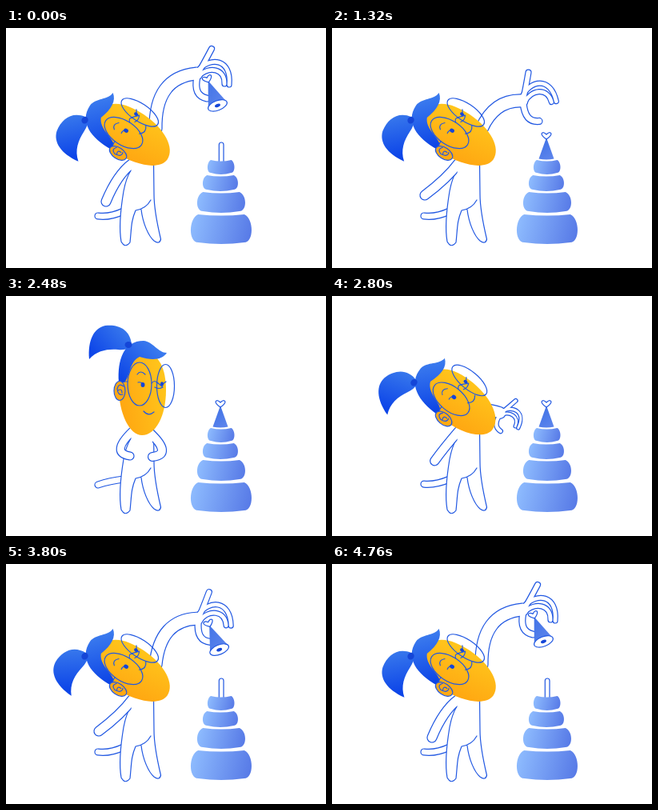
Animation of 400 by 300 pixels, one loop 4800 ms. Source, as an HTML page with a canvas:

```html
<!DOCTYPE html>
<html lang="en">
<head>
<meta charset="utf-8">
<title>Stacking toy</title>
<style>
html, body { margin: 0; width: 100%; height: 100%; overflow: hidden; background: #fff; }
canvas { display: block; width: 400px; height: 300px; }
</style>
</head>
<body>
<canvas id="stage" width="400" height="300"></canvas>
<script>
const ctx = document.getElementById('stage').getContext('2d');
const LOOP = 4800, MIRROR = 2160, LINE = '#2158e2', DARK = '#1546d8';

// elbow x,y, wrist x,y, hand turn
const ARM = {
  up:   [186, 62, 238, 57, 0],
  low:  [203, 88, 240, 91, -18],
  grip: [222, 103, 257, 119, 26],
  open: [203, 90, 237, 91, -18],
  hip:  [208, 198, 183, 201, 60]
};
// tip x,y, turn, how much of the underside shows
const CONE = { up: [253, 67, -21, 1], low: [257, 99, -24, 1], placed: [268, 138, 0, 0] };

const mix = (a, b, u) => a + (b - a) * u;
const mixAll = (a, b, u) => a.map((v, i) => mix(v, b[i], u));
const ease = (t, from, to) => {
  const u = Math.min(1, Math.max(0, (t - from) / (to - from)));
  return u * u * (3 - 2 * u);
};
const through = (t, times, poses) => times.slice(1).reduce(
  (pose, end, i) => mixAll(pose, poses[i + 1], ease(t, times[i], end)), poses[0]);

function ellipse(x, y, rx, ry) {
  const p = new Path2D();
  p.ellipse(x, y, rx, ry, 0, 0, 7);
  return p;
}

function shape(path, fill, stroke) {
  const p = typeof path === 'string' ? new Path2D(path) : path;
  if (fill) { ctx.fillStyle = fill; ctx.fill(p); }
  if (stroke) { ctx.strokeStyle = stroke; ctx.lineWidth = 1.2; ctx.stroke(p); }
}

function ramp(x1, y1, x2, y2, from, to) {
  const g = ctx.createLinearGradient(x1, y1, x2, y2);
  g.addColorStop(0, from);
  g.addColorStop(1, to);
  return g;
}

function at(x, y, deg, draw) {
  ctx.save();
  ctx.translate(x, y);
  ctx.rotate(deg * Math.PI / 180);
  draw();
  ctx.restore();
}

// Round tubes [path, width] merged into one outlined white shape
function tubes(list) {
  for (const [color, grow] of [[LINE, 1.2], ['#fff', -1.2]])
    for (const [path, width] of list) {
      ctx.strokeStyle = color;
      ctx.lineWidth = width + grow;
      ctx.stroke(path);
    }
}

function ring(l, r, t, b) {
  const c = (l + r) / 2, i = (r - l) * .12, out = i / 3, h = b - t;
  shape(`M${l + i} ${t} Q${c} ${t + 3} ${r - i} ${t}
    C${r + out} ${t + h * .15} ${r + out} ${b - 2} ${r - i} ${b - 2}
    Q${c} ${b + 2} ${l + i} ${b - 2}
    C${l - out} ${b - 2} ${l - out} ${t + h * .15} ${l + i} ${t}Z`, ramp(l, t, r, t + h / 2, '#90beff', '#587be7'));
}

function stack(showPole) {
  if (showPole) shape('M266.300 168V146Q266.300 143 269.200 143Q272 143 272 146V168', '#fff', LINE);
  ring(252, 285.5, 165, 183);
  ring(246, 290, 184, 204);
  ring(239, 299, 205, 231);
  ring(231, 307, 233, 270);
}

function cone([x, y, turn, open]) {
  const w = mix(9.5, 12.5, open), len = mix(25.5, 32, open);
  at(x, y, turn, () => {
    shape(`M0 -1 L${w} ${len} Q0 ${len + 2} ${-w} ${len}Z`, ramp(-w, 0, w, len, '#3c70e6', '#5f86ec'));
    if (open > .05) {
      shape(ellipse(0, len, w, 6 * open), '#fff', LINE);
      shape(ellipse(0, len, 3.6 * open, 2 * open), DARK);
    }
    shape('M0 1 Q-6 -3 -6 -6 Q-4 -9 0 -5 Q4 -9 6 -6 Q6 -3 0 1Z', '#fff', LINE);
  });
}

function reachingArm([ex, ey, wx, wy, turn], hip) {
  const list = [[new Path2D(`M${mix(187, 181, hip)} ${mix(126, 172, hip)}Q${ex} ${ey} ${wx} ${wy}`), mix(16, 11, hip)]];
  const size = 1 - hip, place = new DOMMatrix().translate(wx, wy).rotate(turn).scale(size);
  const addFinger = (d, width) => {
    const finger = new Path2D();
    finger.addPath(new Path2D(d), place);
    list.push([finger, width * size]);
  };
  if (size > .02) {
    addFinger('M3 -2Q9 -12 19 -31', 7);
    addFinger('M2 -4C18 -22 44 -18 41 14', 6);
    addFinger('M3 3C16 -10 36 -6 35 13', 6);
    addFinger('M1 4C-2 18 0 28 13 31', 8);
  }
  tubes(list);
}

function body(up, swing, arm, hip) {
  tubes([[new Path2D(`M147 229Q130 ${mix(237, 231, up)} 115 ${mix(235, 236, up)}`), 8]]);
  shape(`M156 178 Q150 188 147 204 C143 228 141 250 144 267 Q149 276 155 268 C157 250 156 242 162 228
    L169 227 C171 244 178 260 185 266 Q192 271 193.500 264 C189 245 185 225 185 208 L184.500 166`, '#fff');
  shape(`M156 178 Q150 188 147 204 C143 228 141 250 144 267 Q149 276 155 268 C157 250 156 242 162 228
    Q175 226 181 215 M169 227 C171 244 178 260 185 266 Q192 271 193.500 264
    C189 245 185 225 185 208 L184.500 166`, null, LINE);
  const rest = mixAll(mixAll([139, 183, 125, 217], [144, 188, 116, 209], swing), [130, 196, 155, 200], hip);
  tubes([[new Path2D(`M158 169Q${rest}`), mix(12, 10, hip)]]);
  reachingArm(arm, hip);
  shape('M155 160H183V184H157Z', '#fff');
}

function head(up, sway) {
  at(mix(147, 167, up), mix(131, 110, up), mix(-56, 0, up), () => {
    ctx.translate(-167, -110);
    at(152, 61, sway, () => {
      ctx.translate(-152, -61);
      shape('M157 60C155 42 141 35 124 37C110 40 102 55 104 79C114 68 127 66 140 67Q150 68 155 64Z',
        ramp(145, 40, 108, 72, '#3676ec', '#0d45e8'));
    });
    shape(`M170 70C192 70 200 92 200 118C200 150 187 174 170 174C154 174 141 146 141 115
      C141 90 150 70 170 70Z`, ramp(143, 125, 198, 115, '#ffa812', '#ffc41b'));
    shape('M141 108C139 80 147 56 172 56C184 57 190 71 201 71C195 80 183 81 167 76C154 82 155 101 148 108Z',
      ramp(145, 106, 185, 62, '#0d45e6', '#3a7aee'));
    shape(ellipse(153, 61, 4.5, 4), DARK);
    shape(ellipse(142, 118.5, 7, 12), '#ffa913', LINE);
    shape('M147 113Q141 108 139 116Q140 125 146 123M140 118Q145 115 145 121', null, LINE);

    shape(ellipse(167, 110, 15, 27), null, LINE);
    shape(ellipse(199.5, 112.5, 11, 27), null, LINE);
    shape('M182 109Q186 104 189 109M152 107L147 107', null, LINE);
    shape('M164 98Q168 92 174 98', null, LINE);
    shape('M165 108Q168 107 172 110M196 110L200 107', null, LINE);
    shape(ellipse(171, 111, 2.5, 3), DARK);
    shape(ellipse(195, 110, 2, 2.8), DARK);
    shape('M189 108L196 114Q191 117 186 114', null, LINE);
    ctx.translate(mix(5, 0, up), mix(-17, 0, up));
    shape('M172 144Q178 151 185 145', null, LINE);
  });
}

function frame() {
  const now = performance.now() % LOOP, t = now - now % 40;
  const placing = t < MIRROR, f = placing ? t : 2 * MIRROR - t; // taking off retraces placing
  const up = ease(f, 1460, 1760), hip = ease(f, 1400, 1720);
  const swing = placing ? ease(t, 0, 1320) : 1 - ease(t, 3800, LOOP);

  // Idle bob of the raised hand
  const bob = f > 0 && f < 640 ? -7 * Math.sin(Math.PI * f / 640) ** 2 : 0;
  const lift = ([x, y, ...rest]) => [x, y + bob, ...rest];
  const arm = through(f, [400, 680, 1080, 1320, 1720], Object.values(ARM));
  arm[1] += bob;
  arm[3] += bob;
  const toy = lift(through(f, [400, 680, 1080], Object.values(CONE)));

  // Ponytail swings gently and trails behind the turning head
  const phase = placing ? t / 1250 : (t - 3240) / 1520;
  const before = f - (placing ? 160 : -160);
  const sway = (1 - 6 * Math.cos(2 * Math.PI * phase)) * (1 - up) + 25 * (ease(before, 1460, 1760) - up);

  ctx.clearRect(0, 0, 400, 300);
  ctx.lineCap = ctx.lineJoin = 'round';
  stack(toy[3] > 0);
  body(up, swing, arm, hip);
  cone(toy);
  head(up, sway);
  requestAnimationFrame(frame);
}
frame();
</script>
</body>
</html>
```
